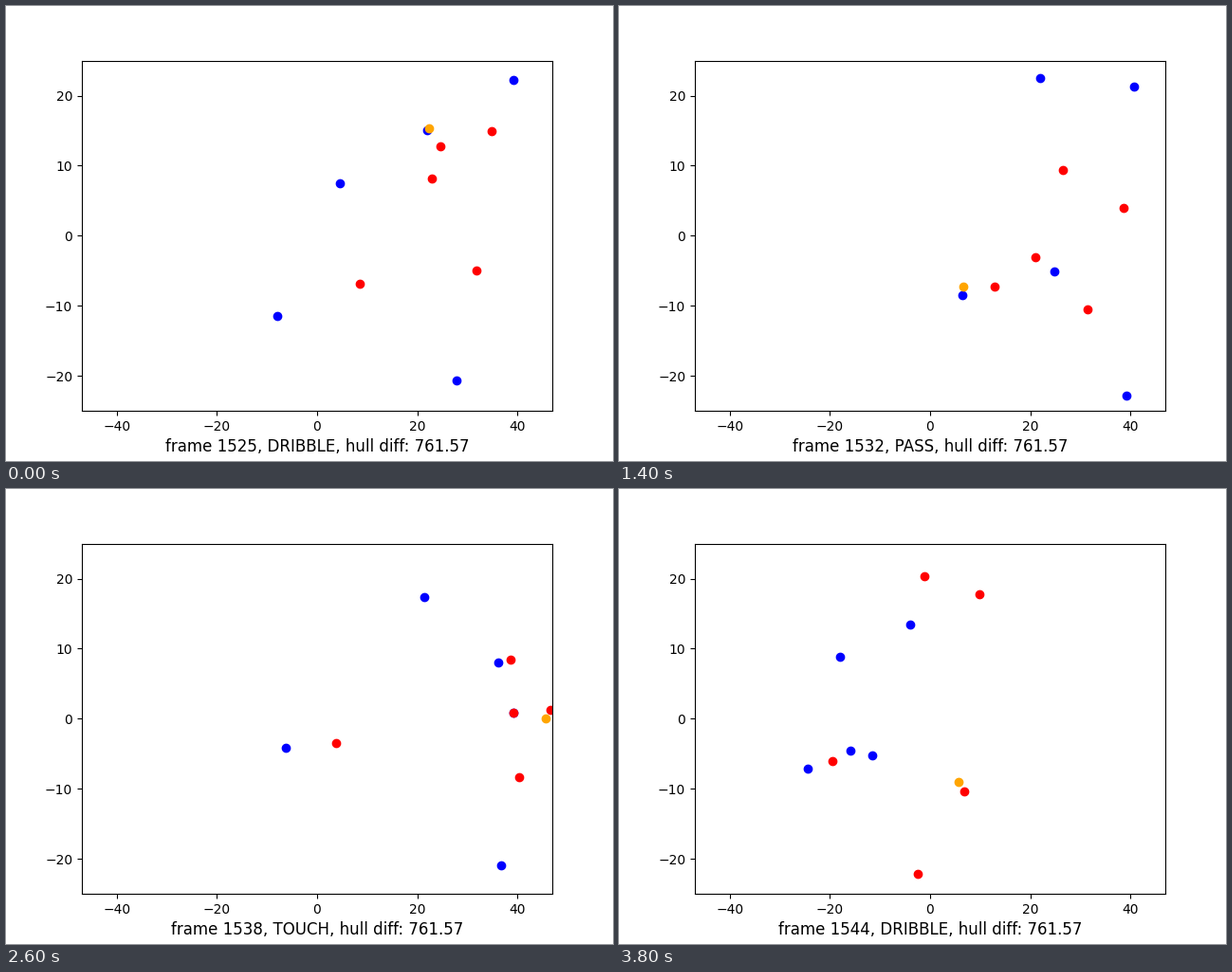
These frames come from a looping animation (640 px wide and 480 px high, 4000 ms). A matplotlib script:

```python
import numpy as np
import matplotlib.pyplot as plt
from matplotlib.animation import FuncAnimation

W, H, DPI = 640, 480, 100
FRAMES, INTERVAL = 20, 200
FIRST = 1525

EVENTS = {"D": "DRIBBLE", "T": "TOUCH", "P": "PASS", "S": "SHOT"}
SEQUENCE = "DPTPTDDPTDPTSTPTDDDD"
CARRIER = "11223333222226666666"  # player index on the ball at each step

# Key steps and each player's position there, in stage pixels.
KEYS = np.array([0, 2, 5, 9, 12, 15, 19])
BLUE = [
    [(535, 78), (545, 74), (540, 72), (546, 112), (547, 191), (410, 154), (307, 143)],
    [(444, 131), (442, 129), (445, 75), (443, 79), (450, 99), (395, 148), (233, 177)],
    [(352, 187), (369, 211), (426, 282), (492, 273), (546, 233), (472, 248), (244, 276)],
    [(286, 327), (328, 340), (388, 336), (328, 274), (314, 270), (242, 283), (199, 295)],
    [(475, 395), (514, 408), (532, 410), (537, 411), (542, 410), (432, 345), (267, 281)],
]
RED = [
    [(458, 148), (459, 153), (462, 162), (480, 185), (535, 197), (511, 126), (380, 111)],
    [(512, 132), (520, 133), (539, 181), (525, 230), (575, 208), (567, 309), (364, 319)],
    [(449, 182), (440, 194), (426, 263), (466, 266), (535, 254), (534, 178), (322, 92)],
    [(496, 279), (518, 280), (497, 348), (492, 292), (542, 292), (533, 350), (315, 406)],
    [(373, 293), (403, 300), (415, 329), (372, 263), (365, 263), (289, 283), (225, 287)],
]
# Ball relative to its carrier at the same key steps.
BALL = [(2, -2), (21, -4), (-1, -11), (4, -5), (2, 4), (-22, 16), (-6, -10)]


def glide(points):
    """Monotone cubic path through the key points, one position per step."""
    p = np.array(points, float)
    gap = np.diff(KEYS)[:, None]
    rate = np.diff(p, axis=0) / gap
    a, b = rate[:-1], rate[1:]
    same_way = a * b > 0
    mean = 2 * a * b / np.where(same_way, a + b, 1)
    slope = np.vstack([rate[:1], np.where(same_way, mean, 0), rate[-1:]])

    t = np.arange(FRAMES)
    k = np.clip(np.searchsorted(KEYS, t, side="right") - 1, 0, len(gap) - 1)
    h = gap[k]
    u = (t - KEYS[k])[:, None] / h
    ease = u * u * (3 - 2 * u)
    return (p[k] * (1 - ease) + p[k + 1] * ease
            + h * u * (1 - u) * (slope[k] * (1 - u) - slope[k + 1] * u))


def to_data(px):
    """Stage pixels to pitch coordinates."""
    x, y = px.T + 0.1
    return (x - 328) * 94 / 496, (242.4 - y) * 50 / 369.6


players = np.array([glide(p) for p in BLUE + RED])
holder = [int(c) for c in CARRIER]
ball = players[holder, np.arange(FRAMES)] + glide(BALL)

fig, ax = plt.subplots(figsize=(W / DPI, H / DPI), dpi=DPI)
ax.set_xlim(-47, 47)
ax.set_ylim(-25, 25)

groups = [(pos, ax.plot([], [], "o", color=color)[0])
          for pos, color in ((players[:5], "blue"), (players[5:], "red"),
                             (ball[None], "orange"))]
caption = fig.text(328 / W, 10 / H, "", fontsize=12, ha="center", va="baseline")


def update(i):
    for pos, dots in groups:
        dots.set_data(*to_data(pos[:, i]))
    event = EVENTS[SEQUENCE[i]]
    caption.set_text(f"frame {FIRST + i}, {event}, hull diff: 761.57")
    return [dots for _, dots in groups] + [caption]


anim = FuncAnimation(fig, update, frames=FRAMES, init_func=lambda: update(0),
                     interval=INTERVAL, repeat=True, repeat_delay=0)
plt.show()
```
